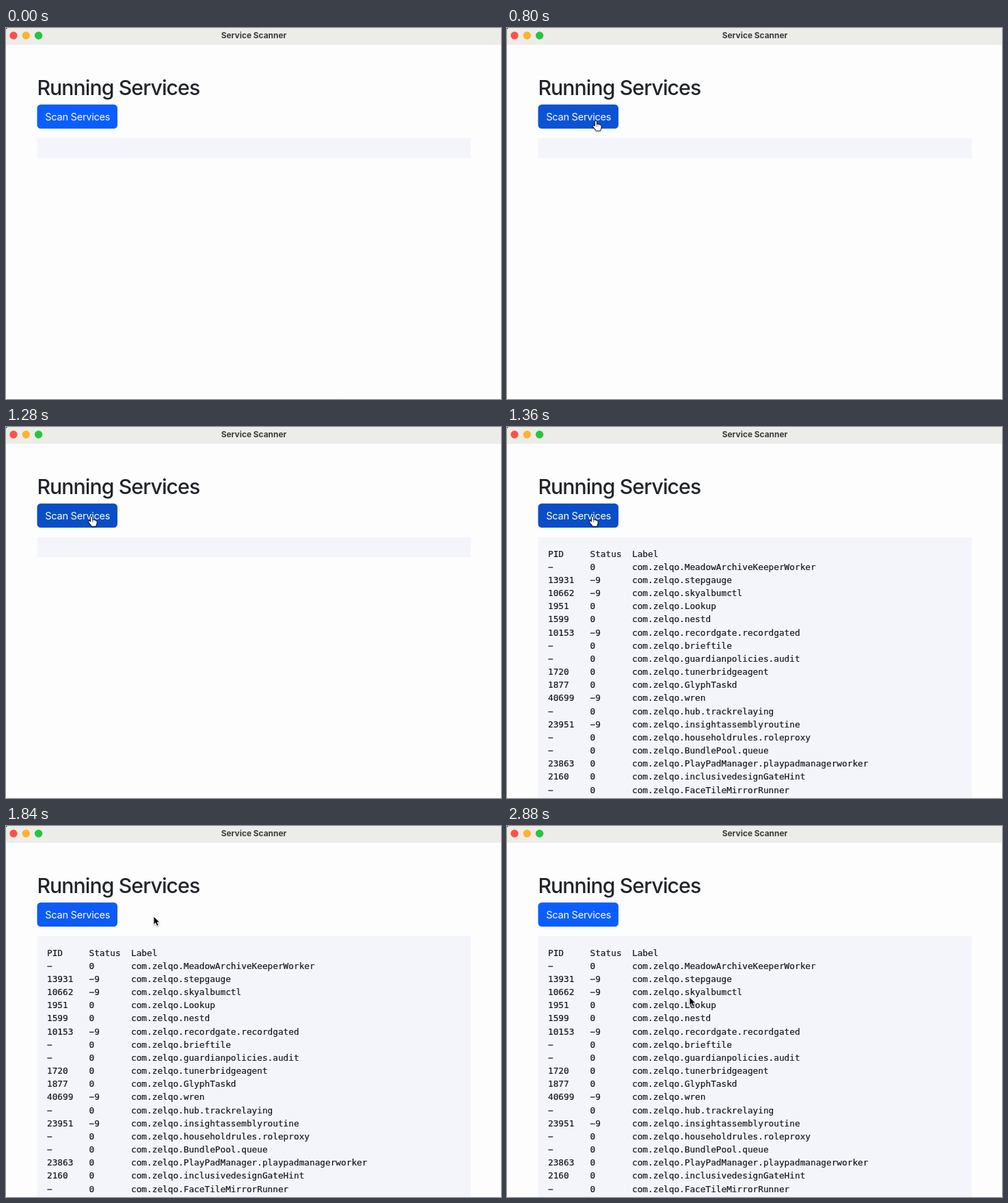
An HTML page that plays this animation: 724 px wide and 542 px high, repeating every 2960 ms.

```html
<!DOCTYPE html>
<html lang="en">
<head>
<meta charset="utf-8">
<title>Service Scanner</title>
<style>
  html, body { margin: 0; height: 100%; overflow: hidden; background: #fdfdfd; }
  svg { display: block; width: 100vw; height: 100vh; }
  text { font-family: Inter, sans-serif; fill: #212529; white-space: pre; }
  #list text { font: 12.76px "DejaVu Sans Mono", monospace; fill: #15181c; stroke: #15181c; stroke-width: .2; }
  .cursor { filter: drop-shadow(0 1px 1px rgba(0, 0, 0, .35)); }
</style>
</head>
<body>
<svg viewBox="0 0 724 542">
  <defs>
    <path id="fingers" d="M0 1V10M2.5 5.5V10M4.6 6V10M6.6 7V10M-3 7.5L1 12.7H5.6L6.6 9"
          stroke-linecap="round" stroke-linejoin="round"/>
  </defs>
  <rect width="724" height="24.5" fill="#ecede8"/>
  <path d="M0 0h2L0 2z" fill="#333"/>
  <g id="lights"></g>
  <text x="362.5" y="14.7" text-anchor="middle" font-size="11.9" font-weight="700" style="fill:#3c3c3b">Service Scanner</text>

  <text x="45.4" y="97.5" font-size="30.2" font-weight="530" letter-spacing="-.9">Running Services</text>
  <rect id="button" x="45.5" y="111.7" width="117.5" height="35.4" rx="5.5"/>
  <text x="57.3" y="135" font-size="14.6" letter-spacing="-.29" style="fill:#fff">Scan Services</text>

  <rect id="panel" x="45.5" y="161" width="634.3" fill="#f3f5fa"/>
  <g id="list"></g>

  <path id="arrow" class="cursor" d="M0 0V12.2L2.8 9.6 4.9 14.2 7.2 13.2 5.2 8.7H9z"
        fill="#000" stroke="#fff" stroke-width=".9"/>
  <g id="hand" class="cursor" fill="#fff">
    <use href="#fingers" stroke="#111" stroke-width="3.6"/>
    <use href="#fingers" stroke="#fff" stroke-width="1.9"/>
  </g>
</svg>
<script>
const LOOP = 2960, STEP = 80, LISTED_AT = 1360;
const $ = id => document.getElementById(id);

const services = `
- 0 MeadowArchiveKeeperWorker
13931 -9 stepgauge
10662 -9 skyalbumctl
1951 0 Lookup
1599 0 nestd
10153 -9 recordgate.recordgated
- 0 brieftile
- 0 guardianpolicies.audit
1720 0 tunerbridgeagent
1877 0 GlyphTaskd
40699 -9 wren
- 0 hub.trackrelaying
23951 -9 insightassemblyroutine
- 0 householdrules.roleproxy
- 0 BundlePool.queue
23863 0 PlayPadManager.playpadmanagerworker
2160 0 inclusivedesignGateHint
- 0 FaceTileMirrorRunner`.trim().split("\n").map(line => {
  const [pid, status, name] = line.replace(/-/g, "\u2212").split(" ");
  return [pid, status, "com.zelqo." + name];
});

$("list").innerHTML = [["PID", "Status", "Label"], ...services].map((row, i) =>
  row.map((cell, c) => `<text x="${60 + c * 61.5}" y="${189.6 + i * 19.17}">${cell}</text>`).join("")
).join("");

$("lights").innerHTML = ["#ff5149", "#fdb32a", "#27c53f"].map((color, i) =>
  `<circle cx="${11 + i * 18.3}" cy="11" r="5.7" fill="${color}"/>`).join("");

// Stops of the pointer; it eases out towards each one between start and end.
const moves = [
  { start: 0, end: 160, x: 213, y: 214 },
  { start: 240, end: 480, x: 169, y: 160 },
  { start: 480, end: 800, x: 130, y: 136 },
  { start: 800, end: 1120, x: 125, y: 131 },
  { start: 1360, end: 1600, x: 128, y: 131 },
  { start: 1600, end: 1840, x: 216, y: 132 },
  { start: 1840, end: 2400, x: 267, y: 250 }
];

const ramp = (t, start, end) => Math.min(1, Math.max(0, (t - start) / (end - start)));
const fade = (t, start) => ramp(t, start, start + 160);

function pointerAt(t) {
  let x = 491, y = 541;
  for (const move of moves) {
    const k = Math.sin(ramp(t, move.start, move.end) * Math.PI / 2);
    x += (move.x - x) * k;
    y += (move.y - y) * k;
  }
  return [x, y];
}

function buttonColor(t) {
  const hover = fade(t, 560) - fade(t, 1720);
  const press = fade(t, 1040) - fade(t, 1360);
  return `rgb(${11 - 2 * press}, ${94 - 11 * hover - 5 * press}, ${254 - 42 * hover - 14 * press})`;
}

const show = (id, on) => $(id).setAttribute("visibility", on ? "visible" : "hidden");

function draw(now) {
  const t = Math.floor(now % LOOP / STEP) * STEP;
  const [x, y] = pointerAt(t);
  const hovering = x < 163 && y < 147;
  const listed = t >= LISTED_AT;

  for (const id of ["arrow", "hand"]) $(id).setAttribute("transform", `translate(${x} ${y})`);
  show("arrow", !hovering);
  show("hand", hovering);
  show("list", listed);
  $("panel").setAttribute("height", listed ? 381 : 29.5);
  $("button").setAttribute("fill", buttonColor(t));
  requestAnimationFrame(draw);
}
requestAnimationFrame(draw);
</script>
</body>
</html>
```
